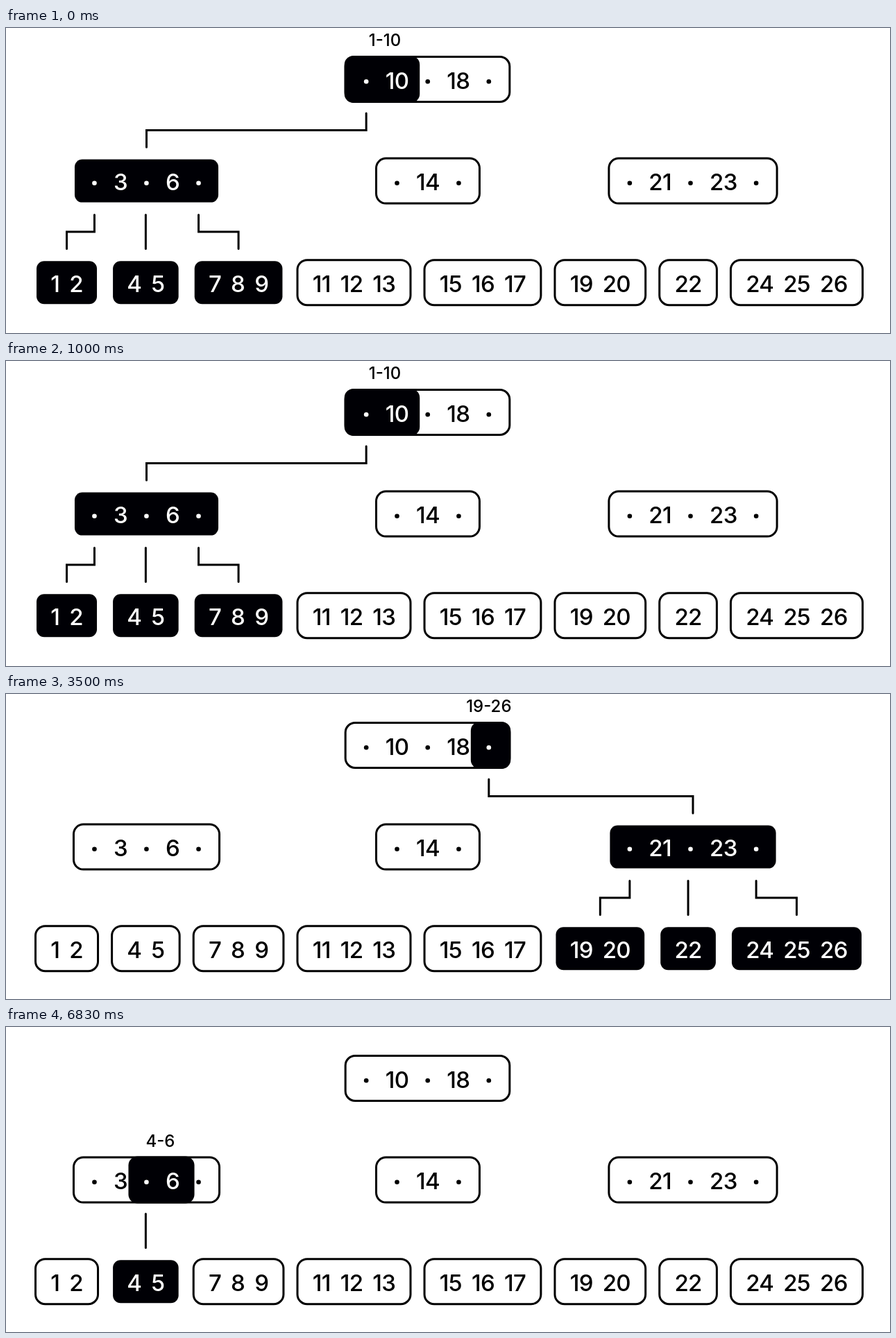
An HTML page that plays this animation: 1274x440 px, repeating every 8000 ms.

```html
<!DOCTYPE html>
<html lang="en">
<head>
<meta charset="utf-8">
<title>B-tree ranges</title>
<style>
  html, body { margin: 0; width: 100%; height: 100%; overflow: hidden; background: #fff; }
  svg { display: block; width: 1274px; height: 440px; }
  text { font: 500 33px Inter, sans-serif; letter-spacing: -0.7px; text-anchor: middle; }
  .label { font-size: 24px; letter-spacing: 0; }
  .page { fill: #fff; }
  .box, .link { fill: none; stroke: #000; stroke-width: 3; }
  .link { stroke-linecap: round; }
  .fill { fill: #000005; }
  .lit { fill: #fff; }

  /* Every scene is opaque and covers the ones before it. */
  .scene { animation: 8s step-end infinite; }
  #scene1 { animation-name: show1; }
  #scene2 { animation-name: show2; }
  #scene3 { animation-name: show3; }
  #scene4 { animation-name: show4; }
  @keyframes show1 { 0% { visibility: hidden } 18.75%, 100% { visibility: visible } }
  @keyframes show2 { 0% { visibility: hidden } 43.75%, 100% { visibility: visible } }
  @keyframes show3 { 0% { visibility: hidden } 65.625%, 100% { visibility: visible } }
  @keyframes show4 { 0% { visibility: hidden } 85.375%, 100% { visibility: visible } }
</style>
</head>
<body>
<svg id="stage" viewBox="0 0 1274 440"></svg>
<script>
  const LAST = 26, HEIGHT = 68, LEFT = 41, RIGHT = 1236;
  const rowTop = row => 40 + 146.6 * row;
  const sum = list => list.reduce((a, b) => a + b, 0);

  const pen = document.createElement('canvas').getContext('2d');
  pen.font = '500 33px Inter, sans-serif';
  const keyWidth = key => pen.measureText(key).width - 0.7 * String(key).length;

  // Inner node: a pointer dot before, between and after the keys
  function inner(row, centre, keys) {
    const pitch = keys.map(k => keyWidth(k) + 55);
    const width = sum(pitch) + 63;
    const left = centre - width / 2;
    const dots = [left + 31.5];
    for (const p of pitch) dots.push(dots.at(-1) + p);
    const at = keys.map((k, i) => (dots[i] + dots[i + 1]) / 2);
    return { y: rowTop(row), left, width, keys, at, dots, kids: [] };
  }

  function leaf(keys) {
    const width = sum(keys.map(keyWidth)) + 14 * (keys.length - 1) + 46.4;
    return { y: rowTop(2), width, keys, dots: [], kids: [] };
  }

  function placeLeaves(leaves) {
    const gap = (RIGHT - LEFT - sum(leaves.map(n => n.width))) / (leaves.length - 1);
    let left = LEFT;
    for (const n of leaves) {
      n.left = left;
      let x = left + 23.2;
      n.at = n.keys.map(k => {
        const w = keyWidth(k);
        x += w + 14;
        return x - 14 - w / 2;
      });
      left += n.width + gap;
    }
  }

  const root = inner(0, 607.5, [10, 18]);
  root.kids = [inner(1, 202.5, [3, 6]), inner(1, 608, [14]), inner(1, 990, [21, 23])];

  // Leaves are the runs of numbers between the inner keys
  const split = new Set([root, ...root.kids].flatMap(n => n.keys));
  const leaves = [];
  let run = [];
  for (let k = 1; k <= LAST + 1; k++) {
    if (k <= LAST && !split.has(k)) { run.push(k); continue; }
    leaves.push(leaf(run));
    run = [];
  }
  placeLeaves(leaves);
  let next = 0;
  for (const n of root.kids) n.kids = n.dots.map(() => leaves[next++]);

  const nodes = [root, ...root.kids, ...leaves];
  const middle = n => n.left + n.width / 2;

  const rect = (x, y, w, h, r, cls) =>
    `<rect class="${cls}" x="${x}" y="${y}" width="${w}" height="${h}" rx="${r}"/>`;
  const text = (s, x, y, cls) => `<text class="${cls}" x="${x}" y="${y}">${s}</text>`;

  function link(n, slot) {
    const to = middle(n.kids[slot]);
    const from = Math.abs(n.dots[slot] - to) < 4 ? to : n.dots[slot];
    return `<path class="link" d="M${from} ${n.y + 83}v24.5H${to}v24.5"/>`;
  }

  function slotFill(n, slot) {
    const { left, width, dots } = n;
    const start = slot ? dots[slot] - 26 : left;
    const end = slot < n.keys.length ? start + dots[slot + 1] - dots[slot] + 20 : left + width;
    return rect(start, n.y, end - start, HEIGHT, 13, 'fill');
  }

  function drawNode(n, filled, slot) {
    let out = filled
      ? rect(n.left + 3, n.y + 3, n.width - 6, HEIGHT - 6, 11, 'fill')
      : rect(n.left + 1.5, n.y + 1.5, n.width - 3, HEIGHT - 3, 14, 'box');
    if (slot >= 0) out += slotFill(n, slot);
    const tone = i => filled || i === slot ? 'lit' : '';
    n.keys.forEach((k, i) => out += text(k, n.at[i], n.y + 47.7, tone(i)));
    n.dots.forEach((x, i) =>
      out += `<circle class="${tone(i)}" cx="${x}" cy="${n.y + 37.2}" r="3.3"/>`);
    return out;
  }

  function drawScene([owner, slot], id) {
    const child = owner.kids[slot];
    const filled = [child, ...child.kids];
    const low = slot ? owner.keys[slot - 1] + 1 : 1;
    const high = owner.keys[slot] ?? LAST;
    const labelX = slot < owner.keys.length ? owner.at[slot] - 17.5 : owner.dots[slot];
    return `<g class="scene" id="scene${id}">` + rect(0, 0, 1274, 440, 0, 'page') +
      nodes.map(n => drawNode(n, filled.includes(n), n === owner ? slot : -1)).join('') +
      link(owner, slot) + child.kids.map((_, i) => link(child, i)).join('') +
      text(`${low}-${high}`, labelX, owner.y - 14, 'label') + '</g>';
  }

  const first = root.kids[0];
  const scenes = [[root, 0], [root, 1], [root, 2], [first, 0], [first, 1]];
  document.getElementById('stage').innerHTML = scenes.map(drawScene).join('');
</script>
</body>
</html>
```
